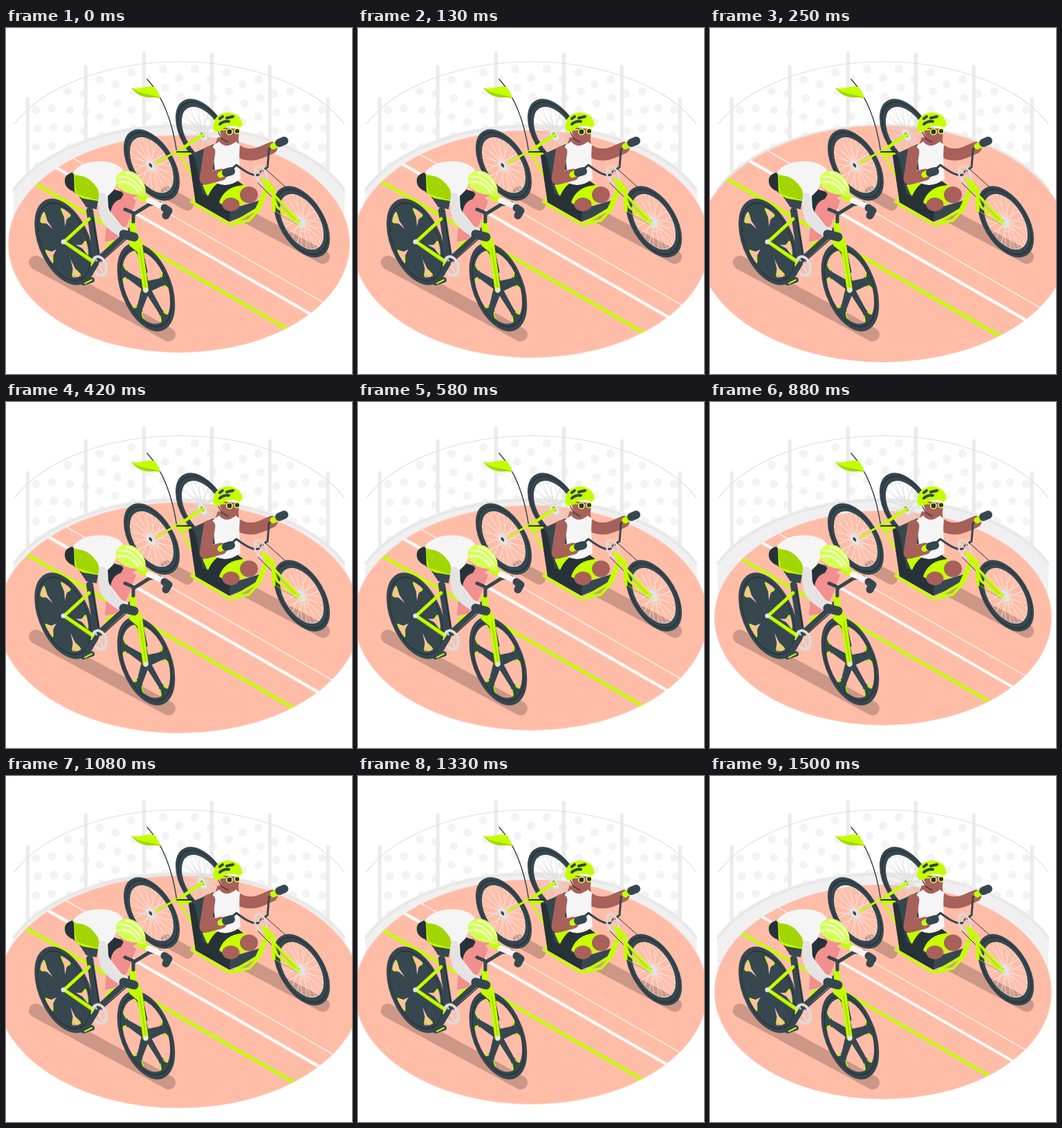
An HTML page for the animation above (1.54 s loop, 500 px wide and 500 px high).

```html
<!DOCTYPE html>
<html lang="en">
<head>
<meta charset="utf-8">
<title>Cycling track</title>
<style>
  html, body { margin: 0; width: 100%; height: 100%; overflow: hidden; background: #fff; }
  svg { display: block; width: 100vw; height: 100vh; }
  #floor { transform-origin: 250px 312px; }
  .dark { fill: #37474f; } .black { fill: #263238; } .green { fill: #c3ff00; }
  .olive { fill: #a3d600; } .white { fill: #f5f5f5; } .grey { fill: #e4e4e4; }
  .skin { fill: #a8605a; } .pink { fill: #f28f8f; }
  .line { fill: none; stroke-linecap: round; stroke-linejoin: round; }
  .l-dark { stroke: #37474f; } .l-black { stroke: #263238; } .l-green { stroke: #c3ff00; }
  .l-olive { stroke: #94c400; } .l-grey { stroke: #dcdcdc; } .l-skin { stroke: #a8605a; }
</style>
</head>
<body>
<svg viewBox="0 0 500 500" xmlns="http://www.w3.org/2000/svg">
  <defs>
    <clipPath id="oval"><ellipse cx="250" cy="312" rx="243.5" ry="155"/></clipPath>
  </defs>

  <!-- fence and wall -->
  <g id="dots" fill="#f3f3f3"></g>
  <g id="poles" fill="#ebebeb"></g>
  <path d="M12 139A260 150 0 0 1 489 139" fill="none" stroke="#dedede" stroke-width="1.2"/>
  <path d="M10 232A260 152 0 0 1 490 232L488 300H12Z" fill="#f0f0f0"/>
  <path d="M11 234A260 152 0 0 1 489 234" fill="none" stroke="#e8e8e8" stroke-width="4"/>

  <g id="floor">
    <ellipse cx="250" cy="312" rx="243.5" ry="155" fill="#ffbda8"/>
    <g id="lanes" clip-path="url(#oval)"></g>
  </g>

  <!-- shadows -->
  <g class="line" stroke="#cc9786">
    <path stroke-width="20" d="M43 339L235 443"/>
    <path stroke-width="18" d="M232 238L262 255"/>
    <path stroke-width="20" d="M310 252L458 331"/>
  </g>

  <!-- handcycle, rear -->
  <g id="farWheel"></g>
  <path class="line l-green" stroke-width="4.5" d="M285 154L247 179"/>
  <path class="line l-dark" stroke-width="1.5" d="M204 74C226 98 240 132 247 180"/>
  <path class="green" d="M181 86C192 91 203 81 216 86L224 101C211 97 194 104 181 86Z"/>
  <path class="olive" d="M181 86C192 97 207 94 224 101C211 99 194 105 181 86Z"/>
  <g id="nearWheel"></g>
  <path class="line l-green" stroke-width="3" d="M217 195L247 178L276 225L272 248"/>
  <path class="line l-green" stroke-width="6" d="M250 181L266 183L274 204"/>
  <path class="line l-black" stroke-width="2" d="M247 179H270"/>

  <!-- seat -->
  <path class="dark" d="M264 184L300 168L306 174L290 232L324 262L373 247L362 264L323 280L274 252Z"/>
  <path class="black" d="M264 184Q270 181 273 188L284 239L324 264L323 280L274 252Z"/>
  <path class="line l-green" stroke-width="4" d="M268 251L323 284L351 278L366 262L381 226M327 283L362 262L376 231"/>

  <!-- seated rider -->
  <path class="green" d="M284 227L306 219L345 226L355 250L324 262L290 241Z"/>
  <ellipse class="skin" cx="351" cy="241" rx="13" ry="12"/>
  <ellipse class="skin" cx="325" cy="255" rx="12.5" ry="10"/>
  <path class="black" d="M292 243Q302 219 328 216L343 227Q314 229 307 255Z"/>
  <path class="line l-skin" stroke-width="17" d="M334 177Q350 187 368 180L384 173"/>
  <path class="skin" d="M306 158L336 161L337 175H300Z"/>
  <path class="white" d="M298 171L308 164Q318 176 332 164L338 169Q336 190 339 218Q321 232 304 224Z"/>
  <path class="line l-skin" stroke-width="17" d="M294 179Q291 200 288 218L311 212"/>
  <path class="skin" d="M307 143L337 146L336 160Q327 173 313 162Z"/>
  <path class="green" d="M299 145Q299 124 320 122Q339 122 342 140L338 144Q320 137 309 150Q302 152 299 145Z"/>
  <path class="line l-dark" stroke-width="4" d="M309 131L313 128M319 130L328 128M309 139Q315 134 322 135"/>
  <path class="line l-black" stroke-width="1.2" d="M307 151L312 160L321 165"/>
  <path class="line l-green" stroke-width="2" d="M309 147H317"/>
  <g fill="#263238" stroke="#eaff50" stroke-width="1.6">
    <circle cx="323" cy="150" r="4.2"/><circle cx="334" cy="149" r="3.8"/>
  </g>

  <!-- hand cranks -->
  <path class="line l-dark" stroke-width="3" d="M399 164L380 175L378 201L368 208M319 210L333 198Q360 219 368 210"/>
  <path class="line l-green" stroke-width="9" d="M386 171L390 169M310 212L314 210"/>
  <path class="line l-dark" stroke-width="12" d="M395 166L402 163M318 209L325 207"/>
  <g class="line l-grey" stroke-width="2.4">
    <ellipse cx="368" cy="212" rx="8" ry="13" transform="rotate(-22 368 212)"/>
    <path stroke-width="1.5" d="M360 203L377 222M363 222L373 201"/>
  </g>
  <path class="line l-black" stroke-width="1" d="M374 203L403 229M364 224L390 250"/>
  <g id="leadWheel"></g>
  <path class="line l-green" stroke-width="3.5" d="M371 221L388 242L421 277M381 228L392 259L426 283"/>
  <path class="line l-green" stroke-width="5" d="M372 219L386 232L387 264"/>
  <path class="line l-olive" stroke-width="1" d="M389 247L418 277M389 265L421 284"/>
  <circle class="grey" cx="428" cy="280" r="4"/>

  <!-- road bike -->
  <g id="rearWheel"></g>
  <path class="pink" d="M149 239L170 233L188 250L175 284L158 306L143 309Z"/>
  <path class="black" d="M149 231L171 238L166 247Q153 251 151 267L145 252Z"/>
  <path class="line l-green" stroke-width="9" d="M148 317L155 311"/>
  <path class="line l-dark" stroke-width="10" d="M121 264L131 329"/>
  <path class="line l-dark" stroke-width="8" d="M132 336L181 291"/>
  <path class="line l-black" stroke-width="1.5" d="M138 337L184 296M125 274L134 326"/>
  <path class="line l-green" stroke-width="5" d="M120 276L84 309L130 340"/>
  <path class="line l-olive" stroke-width="1" d="M86 313L127 342"/>
  <circle class="grey" cx="83" cy="309" r="3.5"/>

  <g id="frontWheel"></g>
  <path class="line l-green" stroke-width="9" d="M183 282L184 300"/>
  <path class="line l-dark" stroke-width="5" d="M193 310L202 352"/>
  <path class="green" d="M178 297L190 296L197 312L206 379Q202 386 198 380L190 324L178 314Z"/>
  <path class="line l-olive" stroke-width="1" d="M193 317L202 376"/>
  <circle class="grey" cx="202" cy="379" r="3.4"/>

  <!-- cranks and pedals -->
  <g class="line l-grey" stroke-width="4">
    <ellipse cx="135" cy="344" rx="9.5" ry="14" transform="rotate(-18 135 344)"/>
    <path stroke-width="2" d="M129 333L141 356M127 349L143 339"/>
  </g>
  <path class="line l-dark" stroke-width="8" d="M130 341L116 364M112 368L124 364"/>
  <path class="line l-green" stroke-width="2" d="M123 343L127 337M114 369L124 364"/>

  <!-- handlebar -->
  <path class="line l-dark" stroke-width="5" d="M172 262L186 268L207 255L222 253M184 268V280"/>

  <!-- racing rider -->
  <path class="black" d="M85 219Q86 210 100 208L130 246Q106 245 97 236Q84 231 85 219Z"/>
  <path class="dark" d="M98 232L134 243L131 262L116 259Z"/>
  <path class="line l-green" stroke-width="9" d="M193 243L206 248"/>
  <path class="line" stroke="#f5f5f5" stroke-width="8" d="M206 249L225 257"/>
  <path class="line l-dark" stroke-width="11" d="M229 260L235 264L231 271"/>
  <path class="green" d="M98 211Q113 207 128 218Q142 228 161 227L135 237L133 250L115 247Q103 245 99 236Z"/>
  <path class="white" d="M96 210C106 194 128 191 146 193Q162 196 169 205L155 235L147 243L148 262L167 286L177 291L169 303Q153 297 139 280Q132 265 134 241Q131 224 115 217Z"/>
  <path class="grey" d="M134 239Q143 235 146 246Q144 263 166 286L176 292L169 303Q153 297 139 280Q132 266 134 239Z"/>
  <path class="olive" d="M99 213Q118 212 129 228Q137 235 133 249L103 240Q99 230 99 213Z"/>
  <path class="line l-dark" stroke-width="13" d="M170 298L185 302"/>
  <path class="pink" d="M164 232L195 238Q183 250 171 242Z"/>
  <path fill="#d5ff56" d="M160 214C165 203 184 204 193 215C203 227 204 239 199 245C190 239 179 242 170 236C160 230 157 221 160 214Z"/>
  <path class="line" stroke="#efffbd" stroke-width="3" d="M164 215Q181 212 195 234M163 223Q179 219 191 237M174 209Q189 212 199 229"/>
</svg>

<script>
const $ = id => document.getElementById(id);
const range = n => Array.from({ length: n }, (_, i) => i);
const polar = (r, deg) => {
  const a = deg * Math.PI / 180;
  return `${(r * Math.cos(a)).toFixed(1)} ${(r * Math.sin(a)).toFixed(1)}`;
};
const ring = (r, color, width, x = 0) =>
  `<circle cx="${x}" r="${r}" fill="none" stroke="${color}" stroke-width="${width}"/>`;

// A circle of radius 100 sheared into a wheel plane running 30° down to the right.
function wheel(id, cx, cy, rx, ry, body) {
  $(id).innerHTML =
    `<g transform="matrix(${rx / 100} ${rx * 0.6 / 100} 0 ${ry / 100} ${cx} ${cy})">${body}</g>`;
}

function spoked(id, cx, cy, color) {
  const lines = range(28).map(i => {
    const a = i * 360 / 28;
    return `M${polar(12, a + (i % 2 ? 35 : -35))}L${polar(80, a)}`;
  }).join("");
  wheel(id, cx, cy, 40.5, 45.5,
    `<path d="${lines}" fill="none" stroke="${color}" stroke-width="2"/>` +
    ring(78, "#d8d8d8", 2, -2) + ring(89, "#37474f", 22) + ring(91, "#263238", 3) +
    `<g transform="translate(-4 3)"><circle r="16" fill="#e4e4e4"/><circle r="6" fill="#37474f"/></g>`);
}

// Five blades, given as half angles at the rim and at the waist radius.
function bladed(id, cx, cy, rx, ry, start, rim, waist, waistR) {
  const blades = range(5).map(i => {
    const a = start + i * 72;
    const accent = side =>
      `M${polar(82, a + side * (rim + 5))}Q${polar(80, a + side * rim)} ${polar(waistR + 6, a + side * waist)}`;
    return `<path fill="#37474f" d="M0 0L${polar(14, a - 60)}L${polar(waistR, a - waist)}` +
      `Q${polar(80, a - rim)} ${polar(86, a - rim - 8)}A86 86 0 0 1 ${polar(86, a + rim + 8)}` +
      `Q${polar(80, a + rim)} ${polar(waistR, a + waist)}L${polar(14, a + 60)}Z"/>` +
      `<path fill="none" stroke="#c3ff00" stroke-width="4" d="${accent(1)}${accent(-1)}"/>`;
  }).join("");
  wheel(id, cx, cy, rx, ry, blades + ring(91, "#37474f", 17) + ring(89, "#263238", 2.5));
}

spoked("farWheel", 285.5, 154, "#d9d9d9");
spoked("nearWheel", 210.5, 198, "#f0e6e2");
spoked("leadWheel", 427.5, 280, "#f0e6e2");
bladed("rearWheel", 84, 309, 43, 57, -50, 22, 32, 62);
bladed("frontWheel", 202.5, 374.5, 42, 59, -34, 10, 8, 62);

// Height of the fence rail at a distance dx from the middle.
const rail = dx => 48 + 150 * (1 - Math.sqrt(1 - (dx / 260) ** 2));

$("dots").innerHTML = range(19).flatMap(col => {
  const dx = 23 * (col - 9);
  return range(4).map(row => {
    const y = rail(dx) + 11 + 27 * row + (col % 2) * 13;
    return `<circle cx="${250 + dx + 3 * (row % 2)}" cy="${y}" r="6"/>`;
  });
}).join("");

$("poles").innerHTML = range(6).map(i => {
  const dx = 84 * (i - 2.5) - Math.sign(2.5 - i) * 7;
  return `<rect x="${245.8 + dx}" y="${rail(dx) - 15}" width="5" height="${104 + 2 * Math.abs(i - 2.5)}"/>`;
}).join("");

// Lanes share one slope; y is where each crosses the middle.
const lane = (y, color, width) =>
  `<path d="M0 ${y - 144}L500 ${y + 144}" stroke="${color}" stroke-width="${width}"/>`;
$("lanes").innerHTML = lane(344.6, "#c3ff00", 4.4) + lane(304, "#fff", 4) + lane(277, "#fff", 1.1);

// Floor pulse: [time in ms, scale].
const LOOP = 1540;
const pulse = [[0, 1.013], [250, 1.103], [880, 1], [1130, 1.103], [1500, 1], [LOOP, 1.013]];
$("floor").animate(
  pulse.map(([t, s]) => ({ offset: t / LOOP, transform: `scale(${s})` })),
  { duration: LOOP, iterations: Infinity });
</script>
</body>
</html>
```
